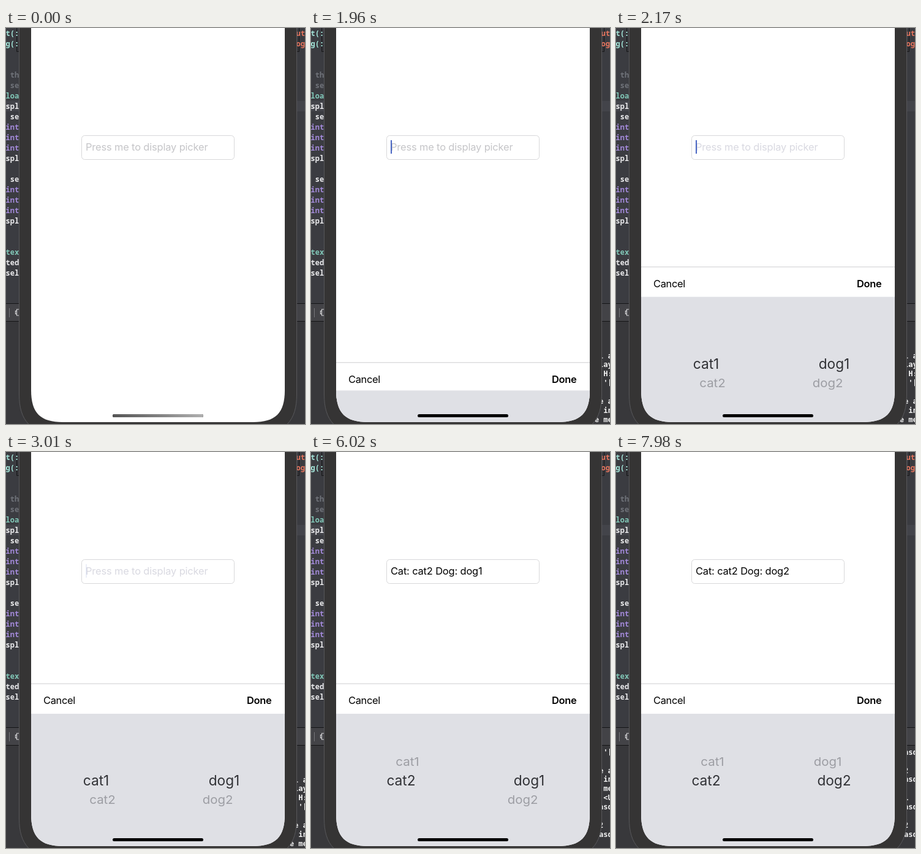
Write an HTML page that moves like this. It is 488 by 646 pixels and loops after 8000 ms.

```html
<!DOCTYPE html>
<html lang="en">
<head>
<meta charset="utf-8">
<title>Picker demo</title>
<style>
  html, body { margin: 0; width: 100%; height: 100%; overflow: hidden; background: #3a3b40; }
  svg { display: block; width: 488px; height: 646px; }
  text { white-space: pre; }
  .ui { font: 16.4px Inter, sans-serif; letter-spacing: -.3px; }
  .bold { font-weight: 600; }
  #field { letter-spacing: -.14px; }
  .code { font: 600 12px "Noto Sans Mono", monospace; }
  .log { font: bold 12px "DejaVu Sans Mono", monospace; fill: #f2f2f2; }
  .wheel { font: 22.7px Inter, sans-serif; text-anchor: middle; }
  #rim { fill: #9c9da3; }
  #lens { fill: #303135; }
</style>
</head>
<body>
<svg viewBox="0 0 488 646">
  <defs>
    <path id="screen" d="M41 -2V591C41 628 56 643 93 643H403C440 643 455 628 455 591V-2Z"/>
    <clipPath id="screenClip"><use href="#screen"/></clipPath>
    <clipPath id="logClip"><rect y="480" width="488" height="166"/></clipPath>
    <clipPath id="lensClip"><rect x="41" y="142.5" width="414" height="32"/></clipPath>
    <clipPath id="rimClip"><path d="M41 60H455V142.5H41ZM41 174.5H455V262H41Z"/></clipPath>
    <linearGradient id="sheen">
      <stop stop-color="#555"/><stop offset=".5" stop-color="#808080"/><stop offset="1" stop-color="#b0b0b0"/>
    </linearGradient>
  </defs>

  <rect width="488" height="646" fill="#3b3c41"/>
  <rect y="119" width="488" height="17" fill="#43444a"/>
  <path d="M17.500 0V38.500H22M478.500 0V38.500H474" fill="#343438" stroke="#18181a"/>
  <g id="code" class="code"></g>
  <rect y="449" width="488" height="30" fill="#434347"/>
  <path d="M0 449.5H488M0 478.5H488" stroke="#141416"/>
  <path d="M5.500 457V472" stroke="#77777b"/>
  <path d="M23 459H17.500V469H23M17.500 461.500H15.500V466.500H17.500" fill="none" stroke="#d4d4d6" stroke-width="1.200"/>
  <rect y="479" width="488" height="167" fill="#38383b"/>
  <g clip-path="url(#logClip)"><g id="log" class="log"></g></g>

  <path d="M21.500 -2H474.500V598C474.500 640 456 662 410 662H86C40 662 21.500 640 21.500 598Z" fill="#353434" stroke="#58585b"/>
  <use href="#screen" fill="#fff"/>

  <rect x="123.500" y="175.500" width="249" height="39" rx="5" fill="#fff" stroke="#d8d8da"/>
  <text id="field" class="ui" x="130" y="200"></text>
  <rect id="caret" y="183" width="2" height="22" fill="#4a67c4"/>

  <g clip-path="url(#screenClip)">
    <g id="panel">
      <rect x="41" width="414" height="60" fill="#fff"/>
      <path d="M41 .5H455" stroke="#cdcdcf"/>
      <text class="ui" x="61" y="33.500">Cancel</text>
      <text class="ui bold" x="393" y="33.500">Done</text>
      <rect id="tray" x="41" width="414" height="300" fill="#dfe0e5"/>
      <g class="wheel">
        <g id="rim" clip-path="url(#rimClip)"></g>
        <g id="lens" clip-path="url(#lensClip)"></g>
      </g>
    </g>
  </g>
  <rect x="174" y="630" width="148" height="5" rx="2.500"/>
  <rect id="shine" x="174" y="630" width="148" height="5" rx="2.500" fill="url(#sheen)"/>
</svg>
<script>
const LOOP = 8000, TICK = 70, LINE = 14.9;
const PANEL_TOP = 377.5, PANEL_TRAVEL = 265.5, WHEEL_Y = 158.5;
const OPEN = 1820, CAT_SET = 4270, DOG_SET = 7210;
const $ = id => document.getElementById(id);

function addText(parent, content, attrs) {
  const el = document.createElementNS('http://www.w3.org/2000/svg', 'text');
  el.textContent = content;
  for (const key in attrs) el.setAttribute(key, attrs[key]);
  return parent.appendChild(el);
}

// Editor: visible ends of the code lines, 17 px apart
const WHITE = '#ececee', GREY = '#70737a', TEAL = '#82c9b9', PURPLE = '#a58bdc', MINT = '#a5e8dc', RED = '#e8765f';
const codeLines = [
  ['t(:', MINT], ['g(:', MINT], [], [], [' th', GREY], [' se', GREY], ['loa', TEAL], ['spl', WHITE], [' se', WHITE],
  ['int', PURPLE], ['int', PURPLE], ['int', PURPLE], ['spl', WHITE], [], [' se', WHITE],
  ['int', PURPLE], ['int', PURPLE], ['int', PURPLE], ['spl', WHITE], [], [],
  ['tex', TEAL], ['ted', WHITE], ['sel', WHITE]
];
codeLines.forEach(([word, fill], i) => {
  if (word) addText($('code'), word, { x: -0.5, y: 13 + i * 17, fill });
});
['ut', 'og'].forEach((word, i) => addText($('code'), word, { x: 473.5, y: 13 + i * 17, fill: RED }));

// Console output, four columns wide
const logLines = [' l a', ' lay', '  H:', "  '[", '', ' e a', '  in', 'e me', '  <U',
  ' asd', '', ' 2', ' asd', '', ' 1', ' asd', '', ' 2', ' asd'];
logLines.forEach((line, i) => addText($('log'), line, { x: 462.8, y: 538.5 + i * LINE }));

// Each wheel is drawn twice: flat in the lens, tilted outside it
const wheels = [
  { name: 'cat', x: 147, tilt: 10.5, start: 3150, end: 4060 },
  { name: 'dog', x: 356, tilt: -10.5, start: 6440, end: 7140 }
];
for (const wheel of wheels) {
  wheel.items = [1, 2].map(n => ({
    lens: addText($('lens'), wheel.name + n, { y: 8.3 }),
    rim: addText($('rim'), wheel.name + n, { y: 8.3 })
  }));
}

const clamp = v => Math.min(1, Math.max(0, v));
const smooth = v => v * v * (3 - 2 * v);

function spring(ms) {
  const p = Math.max(0, ms) * 0.01714;
  return 1 - (1 + p) * Math.exp(-p);
}

function caretOpacity(t) {
  if (t < OPEN) return 0;
  if (t < 2830) return 1;
  const phase = (t - 2830) % 990;
  return phase < 440 ? 1 - clamp(phase / 200) : clamp((phase - 440) / 210);
}

function drawWheel({ x, tilt, start, end, items }, t) {
  const pos = smooth(clamp((t - start) / (end - start)));
  items.forEach(({ lens, rim }, i) => {
    const d = i - pos;
    lens.setAttribute('transform', `translate(${x} ${WHEEL_Y + 34 * d})`);
    rim.setAttribute('transform', `translate(${x + tilt} ${WHEEL_Y + 31.3 * d}) scale(.9 .85)`);
  });
}

function render(t) {
  const field = $('field'), caret = $('caret');
  const filled = t >= CAT_SET;
  field.textContent = filled ? `Cat: cat2 Dog: dog${t < DOG_SET ? 1 : 2}` : 'Press me to display picker';
  field.setAttribute('fill', filled ? '#000' : t < 2100 ? '#c5c5c8' : '#d9d9e1');
  caret.setAttribute('x', filled ? 130 + field.getComputedTextLength() : 130);
  caret.setAttribute('opacity', caretOpacity(t));

  const hidden = 1 - spring(t - 1885);
  $('panel').setAttribute('transform', `translate(0 ${PANEL_TOP + PANEL_TRAVEL * hidden})`);
  $('panel').setAttribute('visibility', hidden < 1 ? 'visible' : 'hidden');
  $('tray').setAttribute('y', 49.5 - 5.5 * hidden);
  wheels.forEach(wheel => drawWheel(wheel, t));

  const scrolled = t < 4130 ? 0 : t < CAT_SET ? 1 : t < DOG_SET ? 6 : 12;
  $('log').setAttribute('transform', `translate(0 ${-scrolled * LINE})`);
  $('log').setAttribute('visibility', t < OPEN ? 'hidden' : 'visible');
  $('shine').setAttribute('opacity', 1 - clamp(t / 210));
}

const began = performance.now();
function frame() {
  const ms = (performance.now() - began) % LOOP;
  render(Math.floor(ms / TICK) * TICK);
  requestAnimationFrame(frame);
}
frame();
</script>
</body>
</html>
```
